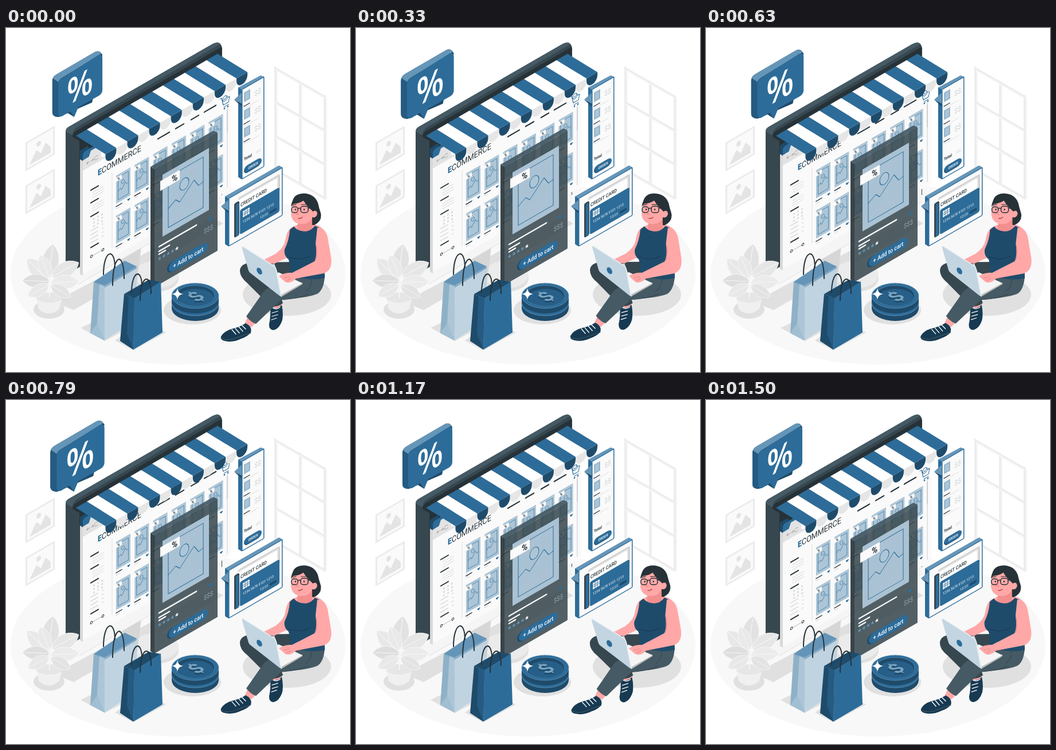
These frames come from a looping animation (600 by 600 pixels, 1.54 s). An HTML page:

```html
<!DOCTYPE html>
<html lang="en">
<head>
<meta charset="utf-8">
<style>
html, body { margin: 0; width: 100%; height: 100%; overflow: hidden; background: #fff; }
svg { display: block; width: 100vw; height: 100vh; }
text { font-family: Roboto, Arial, sans-serif; }
.wide { font-family: 'Open Sans', sans-serif; }
.line { fill: none; stroke-linecap: round; stroke-linejoin: round; }
</style>
</head>
<body>
<svg id="stage" viewBox="0 0 600 600"></svg>
<script>
const BLUE = '#2d6c99', NAVY = '#1f4b6b', MID = '#6596b8', PALE = '#adc6d7';
const INK = '#263238', SLATE = '#37474f', STEEL = '#455a64', SKIN = '#ffa8a7', GREY = '#e0e0e0';

const repeat = (n, draw) => Array.from({ length: n }, (_, i) => draw(i)).join('');
const shape = (d, fill, extra = '') => `<path d="${d}" fill="${fill}" ${extra}/>`;
const line = (d, color, width = 1) => `<path class="line" d="${d}" stroke="${color}" stroke-width="${width}"/>`;
const rect = (x, y, w, h, fill, r = 0, extra = '') =>
  `<rect x="${x}" y="${y}" width="${w}" height="${h}" rx="${r}" fill="${fill}" ${extra}/>`;
const oval = (x, y, rx, ry, fill, extra = '') =>
  `<ellipse cx="${x}" cy="${y}" rx="${rx}" ry="${ry}" fill="${fill}" ${extra}/>`;
// Isometric wall plane: x keeps its screen width, y is sheared
const wall = (x, y, body, angle = -30) => `<g transform="translate(${x} ${y})skewY(${angle})">${body}</g>`;
const label = (x, y, size, str, fill, weight = 400, extra = '') =>
  `<text transform="translate(${x} ${y})scale(.866 1)" font-size="${size}" font-weight="${weight}" fill="${fill}" ${extra}>${str}</text>`;
const middle = 'text-anchor="middle"';
const heart = (x, y, s) =>
  shape(`M${x} ${y + s}l${-s} ${-s}q0 ${-s} ${s} ${-s * .4}q${s} ${-s * .6} ${s} ${s * .4}z`, BLUE);
const star = (x, y, fill) => shape(`M${x} ${y - 3.5}l.9 2.4h2.3l-1.8 1.6.8 2.6-2.2-1.5-2.2 1.5.8-2.6-1.8-1.6h2.3z`, fill);

function room() {
  const panes = repeat(3, i => line(`M${i * 43 + 2} 1v178`, '#ededed', 4) + line(`M${i * 43 + 5} 3v175`, '#f7f7f7', 2)) +
    repeat(4, i => line(`M2 ${i * 59 + 2}h86`, '#ededed', 4) + line(`M3 ${i * 59 + 5}h84`, '#f7f7f7', 2));
  const picture = rect(1.5, 1.5, 48, 47, '#fafafa', 0, 'stroke="#ebebeb" stroke-width="3"') +
    shape('M7 43L19 24l8 10 8-14 9 13v10z', '#e4e4e4') + oval(23, 15, 4, 4.5, '#e4e4e4');
  return oval(300, 428, 292, 159, '#f8f8f8') + wall(468, 67, panes, 30) +
    wall(34, 200, picture) + wall(34, 275, picture);
}

function plant() {
  const leaf = ([x, y, angle, size, fill]) => `<g transform="translate(${x} ${y})rotate(${angle})scale(${size})">` +
    shape('M0 0C-17-12-15-36 0-48C15-36 17-12 0 0Z', fill, 'stroke="#f8f8f8" stroke-width=".8"') +
    line('M0 0V-44', '#f6f6f6') + '</g>';
  return oval(75, 491, 27, 16, GREY) +
    shape('M53 470L57 490Q74 506 93 490L98 470Z', '#f0f0f0') + oval(75.5, 470, 23, 9, '#e6e6e6') +
    line('M76 470V415M76 450Q88 430 105 418', '#f4f4f4', 2) +
    [[74, 434, 8, 1.2, '#e2e2e2'], [74, 440, -45, 1.1, '#e8e8e8'], [80, 434, 62, 1.1, '#e6e6e6'], [76, 442, -88, .98, '#dedede'],
      [78, 444, 88, 1.02, '#ebebeb'], [76, 436, -22, .9, '#e9e9e9'], [75, 448, -118, .86, '#e8e8e8'], [78, 449, 120, .83, '#e3e3e3']].map(leaf).join('');
}

function monitor() {
  return shape('M84 478L118 492 379 341 360 330Z', GREY) +
    oval(262, 437, 39, 23, GREY) + oval(262, 430, 39, 24, '#ebebeb') +
    shape('M203 400L236 381 228 447 190 458Z', '#d6d6d6') +
    shape('M104 431V181Q104 175 110 172L360 28Q374 20 377 35V291L128 432Z', SLATE) +
    shape('M104 181Q104 175 110 172L360 28Q369 23 374 28L124 173Q116 179 116 187Z', STEEL) +
    shape('M116 425V190Q116 183 123 179L376 33V288L128 431Z', INK) +
    shape('M116 425V190L128 197V431Z', SLATE) +
    shape('M104 431L128 417 376 274V302L128 446 104 432Z', '#f5f5f5') + line('M128 446L376 303', GREY);
}

function product(x, y) {
  return `<g transform="translate(${x} ${y})">` + rect(0, 0, 25, 49, PALE) +
    rect(3.5, 5, 18, 39, 'none', 0, `stroke="${BLUE}" stroke-width=".6"`) +
    oval(12, 17, 2.6, 3.3, 'none', `stroke="${BLUE}" stroke-width=".6"`) +
    line('M3.5 30l4-4 2 4 7-10 2 5 3-1', BLUE, .6) +
    rect(-1, 4, 11, 7, '#fafafa') + label(4.5, 10, 7, '%', INK, 700, middle) +
    line('M0 54h10', INK, 1.6) + line('M0 58h6', '#d5d5d5', 1.2) + heart(22, 54, 2.5) + '</g>';
}

function page() {
  const sidebar = [60, 82, 106, 160].map(y => line(`M14 ${y}h13`, INK, 2.2)).join('') +
    repeat(3, i => line(`M17 ${66 + i * 4.5}h19M17 ${89 + i * 4.5}h19`, '#dcdcdc', 1.2)) +
    repeat(9, i => rect(18 + i % 3 * 7, 112 + Math.floor(i / 3) * 6, 3, 3, '#dcdcdc')) +
    repeat(4, i => line(`M14 ${131 + i * 7}h12M34 ${131 + i * 7}h1.5`, '#dcdcdc', 1.8)) +
    line('M15 176h20', '#b5b5b5') + oval(15, 176, 1.8, 2, '#fff', `stroke="${INK}"`) + oval(35, 176, 1.8, 2, '#fff', `stroke="${INK}"`);
  const menu = line('M131 38h20M162 38h14M189 38h13M212 38h20', INK, 2.4);
  const cart = line('M239 31h3l3 14h9l2-9h-13M246 49h8', BLUE, 1.1) + oval(247, 52, 1.3, 1.5, BLUE) + oval(253, 52, 1.3, 1.5, BLUE) +
    oval(248, 35, 4, 4.4, '#fff', `stroke="${BLUE}"`) + line('M246 35l2 2 3-4', BLUE);
  return shape('M129 214L134 217V432L129 429Z', '#d9d9d9') + shape('M129 214L142 206 146 210 134 217V232L129 229Z', NAVY) +
    wall(134, 231,
      rect(0, -14, 259, 40, BLUE, 4) + rect(0, 0, 259, 199, '#fafafa', 6) + rect(0, 0, 259, 18, '#e3e3e3') +
      shape('M10 1l4-10h55v10z', '#e3e3e3') + rect(32, 3, 200, 12, '#fafafa', 5) +
      line('M12 9h-5l2-2m-2 2l2 2M14 9h5l-2-2m2 2l-2 2M26 7a3 3.3 0 1 0 0 4', '#999', .8) +
      label(26, 42, 14.5, `<tspan fill="${BLUE}" font-weight="800">E</tspan>COMMERCE`, INK) +
      sidebar + menu + cart + line('M51 51v132', '#dedede') +
      repeat(12, i => product(58 + i % 6 * 32.3, i < 6 ? 60 : 130)) +
      line('M252 54v138', '#e3e3e3', 2) + line('M252 58v38', '#cfcfcf', 2));
}

function awning() {
  const flaps = repeat(13, i => shape(`M${i * 19.05} 0h19.05v5a9.5 11 0 0 1-19.05 0z`, i % 2 ? '#e6e6e6' : NAVY));
  const edge = i => [122 + i * 19, 188 - i * 11, 173.5 + i * 19.05, 220 - i * 11];
  const stripes = repeat(13, i => {
    const [x0, y0, x1, y1] = edge(i), [x2, y2, x3, y3] = edge(i + 1);
    return shape(`M${x0} ${y0}L${x2} ${y2} ${x3} ${y3} ${x1} ${y1}z`, i % 2 ? '#fff' : BLUE);
  });
  return wall(173.5, 220, flaps) + stripes;
}

function detailPanel() {
  return shape('M252 242L362 179 369 182.5 259 246Z', STEEL, 'opacity=".92"') +
    shape('M252 242L259 246V452L252 448Z', INK, 'opacity=".9"') +
    wall(259, 246,
      rect(0, 0, 110, 206, SLATE, 1, 'opacity=".86"') + rect(14, 18, 81, 108, PALE, 0, 'opacity=".97"') +
      rect(24, 28, 61, 88, 'none', 0, `stroke="${BLUE}"`) +
      oval(52, 56, 8, 10, PALE, `stroke="${BLUE}"`) + line('M24 83L37 75 44 83 69 59 77 73 85 71', BLUE) +
      rect(10, 27, 34, 17, '#fafafa') + label(35, 41.5, 16, '%', INK, 700, middle) +
      line('M8 140h65M8 148h18M8 153h11', '#fff', 2.6) + repeat(5, i => star(9 + i * 7.5, 161, i < 4 ? MID : '#fff')) +
      label(94, 163, 11, '$$$', '#90a4ae', 400, middle) + heart(97, 143, 3.5) +
      rect(22, 179, 68, 18, NAVY, 9) + rect(25, 179, 68, 18, BLUE, 9) +
      label(59, 192, 10.6, '+ Add to cart', '#fff', 500, middle));
}

function receipt() {
  return shape('M405 104L444 83 450 85 411 107V264L405 260Z', BLUE) + shape('M405 104L444 83 450 85 411 107Z', MID) +
    shape('M398 125L411 113V132Z', MID) + shape('M398 125L411 132V137Z', NAVY) +
    wall(411, 107, rect(.75, .75, 38, 156, '#fafafa', 1, `stroke="${BLUE}" stroke-width="1.5"`) +
      repeat(3, i => {
        const y = 8 + i * 31;
        return rect(4, y, 11, 17, PALE) + rect(5.5, y + 2, 8, 13, 'none', 0, `stroke="${MID}" stroke-width=".5"`) +
          label(28, y + 17, 12, '$$', '#cfd4d7', 400, middle) + line(`M4 ${y + 24}h10`, INK, 1.4) + line(`M4 ${y + 28}h26`, '#d6d6d6', .8);
      }) +
      label(4, 127, 7.2, 'Total', INK, 700) + label(29, 127, 6, '$$$', '#cfd4d7', 400, middle) +
      rect(4, 138, 30, 13, NAVY, 6.5) + rect(5, 138, 30, 12, BLUE, 6) + label(20, 146.5, 6.3, 'ORDER', '#fff', 500, middle));
}

function creditCard() {
  return shape('M382 294L476 240 482 243 388 297V381L382 377Z', BLUE) + shape('M382 294L476 240 482 243 388 297Z', MID) +
    shape('M375 311L388 300V319Z', MID) + shape('M375 311L388 319V323Z', NAVY) +
    wall(388, 297, rect(.75, .75, 93, 83, '#fafafa', 1, `stroke="${BLUE}" stroke-width="1.5"`) +
      rect(17, 9, 73, 30, '#d2d2d2', 3) + rect(15, 12, 72, 30, '#e6e6e6', 3) + rect(13, 14, 72, 30, '#fff', 3) +
      rect(10, 15, 9, 60, SLATE, 3) + rect(13, 18, 5, 57, BLUE, 2) +
      label(21, 27, 8.6, 'CREDIT CARD', INK, 500) + rect(20, 32, 69, 43, BLUE, 3) +
      rect(25, 37, 12, 11, '#f5f5f5', 1) + line('M25 41h12M25 44h12M29 37v11M33 37v11', BLUE, .7) +
      label(25, 58, 6.4, '1234 5678 9101 1213', '#fff') + label(55, 68, 6, '12/23', '#fff') +
      rect(72, 65, 12, 4, NAVY, 1));
}

function bags() {
  const handle = (x, y, w, h) => line(`M${x} ${y}c0 ${-h * 1.35} ${w} ${-h * 1.5} ${w} -12`, INK, 2);
  return shape('M130 523L172 546 240 510 200 490Z', GREY) + shape('M190 545L222 562 279 531 240 510Z', GREY) +
    shape('M153 443L207 406 228 416 172 449Z', MID) + handle(170, 430, 20, 32) +
    shape('M153 443L172 451 172 545 147 532Z', '#8fb1c8') + shape('M172 451L228 416V508L172 545Z', '#c0d3e0') +
    shape('M153 443L207 406 228 416V419L172 453Z', MID, 'opacity=".65"') +
    shape('M163 447L172 451V545L159 515Z', PALE) + shape('M159 515L172 545 147 532Z', '#a0bfd3') + handle(186, 449, 20, 41) +
    shape('M206 464L249 439 270 443 224 472Z', NAVY) + handle(219, 462, 18, 29) +
    shape('M206 464L224 472 222 561 199 546Z', NAVY) + shape('M224 472L270 442 273 531 222 561Z', BLUE) +
    shape('M214 468L224 472 222 561 211 533Z', '#255b82') + handle(234, 475, 19, 33);
}

function coins() {
  const coin = y => shape(`M289 ${y}v9a41 22 0 0 0 82 0v-9z`, NAVY) + oval(330, y, 41, 22, BLUE, `stroke="${MID}" stroke-width=".8"`);
  const dollar = (y, fill) =>
    `<text transform="matrix(.866 -.5 .866 .5 341 ${y})" font-size="32" font-weight="700" text-anchor="middle" fill="${fill}">$</text>`;
  return oval(325, 492, 50, 25, GREY) + coin(480) + coin(467) +
    oval(330, 467, 34, 18, NAVY, `stroke="${MID}" stroke-width=".6"`) + oval(331, 470, 31, 15, '#275f88') +
    dollar(477, NAVY) + dollar(474, '#79a5c2') +
    shape('M299 454q1 9 10 10q-9 1-10 10q-1-9-10-10q9-1 10-10z', '#fff');
}

function shoes() {
  return shape('M461 486Q471 493 481 483Q484 497 482 509Q477 525 466 527Q458 526 459 516Q462 503 461 486Z', '#173a52') +
    line('M464 497l10-3M464 503l10-3M463 509l9-3M465 488q7 4 13-1', '#fff', 1.3) +
    shape('M418 515Q430 521 427 531Q422 538 410 542Q396 549 382 546Q373 544 375 538Q380 529 393 525Q407 522 418 515Z', '#173a52') +
    line('M376 541q11 6 27-1q12-5 24-8', STEEL, 1) +
    line('M394 526l7 8M400 524l7 8M406 521l7 8M411 518l7 7', '#fff', 1.4);
}

function legs() {
  return shape('M461 477L480 474 481 487Q471 493 461 488Z', SKIN) +
    shape('M422 503L436 514 428 522 416 516Z', SKIN) + shoes() +
    shape('M500 408L437 409Q410 408 408 422Q407 434 421 445L461 485Q473 488 483 480L474 455 520 440Z', SLATE) +
    shape('M497 436L556 431Q555 455 544 463Q531 470 480 474L436 516Q427 513 419 503L447 463Q455 450 484 447Z', STEEL) +
    line('M480 474q30-2 47-10M533 439q0 14-10 20', SLATE, 1);
}

function head() {
  return shape('M499 309Q499 289 519 288.5Q538 289 544 305Q546 314 549 323Q552 337 537 344Q515 341 499 309Z', INK) +
    shape('M510 330H534V350Q523 359 508 351Z', '#f28f8f') +
    shape('M499 306Q512 307 517 299Q526 309 535 320Q542 316 543 324Q541 332 534 330Q530 342 515 342Q499 341 497 325Z', SKIN) +
    shape('M497 312Q499 292 519 292Q530 294 537 320Q526 314 519 301Q512 306 501 307Z', INK) +
    `<g fill="none" stroke="${INK}" stroke-width="1.5">` + rect(498, 312, 11, 10, 'none', 4) + rect(514, 311, 13, 11, 'none', 4) +
    '<path d="M509 315q2.5-1.5 5 0M527 314l10 1"/></g>' +
    oval(505, 316.5, 1.2, 1.6, INK) + oval(520, 316.5, 1.2, 1.6, INK) +
    line('M500 309l6-1M515 308l8 0', INK, 1.2) + line('M510 318l-3 7 4 0', '#ec7f7f', 1) + line('M510 332q4 1 7-2', '#b13d4a', 1.4);
}

function woman() {
  return legs() +
    shape('M500 347Q490 351 487 371Q485 383 470 394L450 404Q458 412 468 411L492 400 505 385Z', SKIN) +
    shape('M508 343L533 341Q548 344 556 354L540 385 510 362 492 362Q496 348 508 343Z', SKIN) +
    shape('M502 346Q508 354 519 354Q532 354 539 345L546 348Q549 375 552 396Q556 415 556 436Q528 443 494 429Q497 418 493 404Q484 397 486 386Q494 370 495 352Z', NAVY) +
    line('M494 399q17 8 36-1', '#173a52', 1.2) + head() +
    shape('M468 411L475 430 517 446 479 468 425 425Z', '#d5d5d5') +
    shape('M478 465L517 444V447L480 469Z', '#bdbdbd') + shape('M475 426L517 445 479 466 467 440Z', '#f5f5f5') +
    shape('M543 348Q557 349 561 365L567 400Q570 423 554 428L506 437Q496 447 487 443L476 433Q486 426 499 427L538 407Q543 397 540 376Z', SKIN) +
    line('M541 379q3 15-1 27M485 436l10-2M490 441l7-4', '#ec8585', 1) +
    shape('M413 381Q411 381 412 385L423 423Q424 426 427 428L477 467Q480 468 479 464L471 421Q470 417 467 415Z', '#c3d5e1') +
    line('M413 381L467 415Q470 417 471 421L480 468', '#e7eff4', 1.5) +
    `<ellipse cx="442" cy="424" rx="4" ry="6.5" transform="rotate(-32 442 424)" fill="${BLUE}"/>`;
}

function bubble() {
  return shape('M81 92Q81 85 88 81L155 42Q161 39 165 43L168 47 150 130 92 155Q81 155 81 147Z', NAVY) +
    shape('M82 88Q83 84 88 81L155 42Q162 39 166 45L96 88Q92 91 91 95Z', MID) +
    shape('M82 88L91 94V155Q81 154 81 147V92Z', '#255b82') + shape('M106 147L119 155 114 140Z', NAVY) +
    shape('M91 98Q91 92 97 88L160 48Q168 44 168 53V108Q168 114 162 118L126 138 119 155 112 145 99 153Q91 157 91 148Z', BLUE) +
    wall(129, 101, label(0, 22, 61, '%', '#fff', 600, middle + ' class="wide"'));
}

const group = (id, body) => `<g id="${id}">${body}</g>`;
const stage = document.getElementById('stage');
stage.innerHTML = room() + monitor() + plant() + group('page', page()) + awning() +
  group('panel', detailPanel()) + receipt() + creditCard() + bags() + coins() +
  oval(490, 465, 77, 37, GREY) + group('woman', woman()) + group('bubble', bubble());

const LOOP = 1540, BEAT = 520;
const move = (id, value) => document.getElementById(id).setAttribute('transform', value);
const wave = phase => (1 - Math.cos(2 * Math.PI * phase)) / 2;

function render(now) {
  const t = now % LOOP;
  const lift = -10 * wave(t / LOOP);
  move('page', `translate(0 ${lift})`);
  move('panel', `translate(0 ${lift})`);
  move('woman', `rotate(${.55 * Math.sin(2 * Math.PI * t / LOOP)} 520 440)`);
  // Two heartbeats, then a rest
  const beat = (t + 30) % LOOP;
  const scale = 1 + (beat < 2 * BEAT ? .09 * wave(beat / BEAT) : 0);
  move('bubble', `translate(124 97)scale(${scale})translate(-124 -97)`);
  requestAnimationFrame(render);
}
render(performance.now());
</script>
</body>
</html>
```
